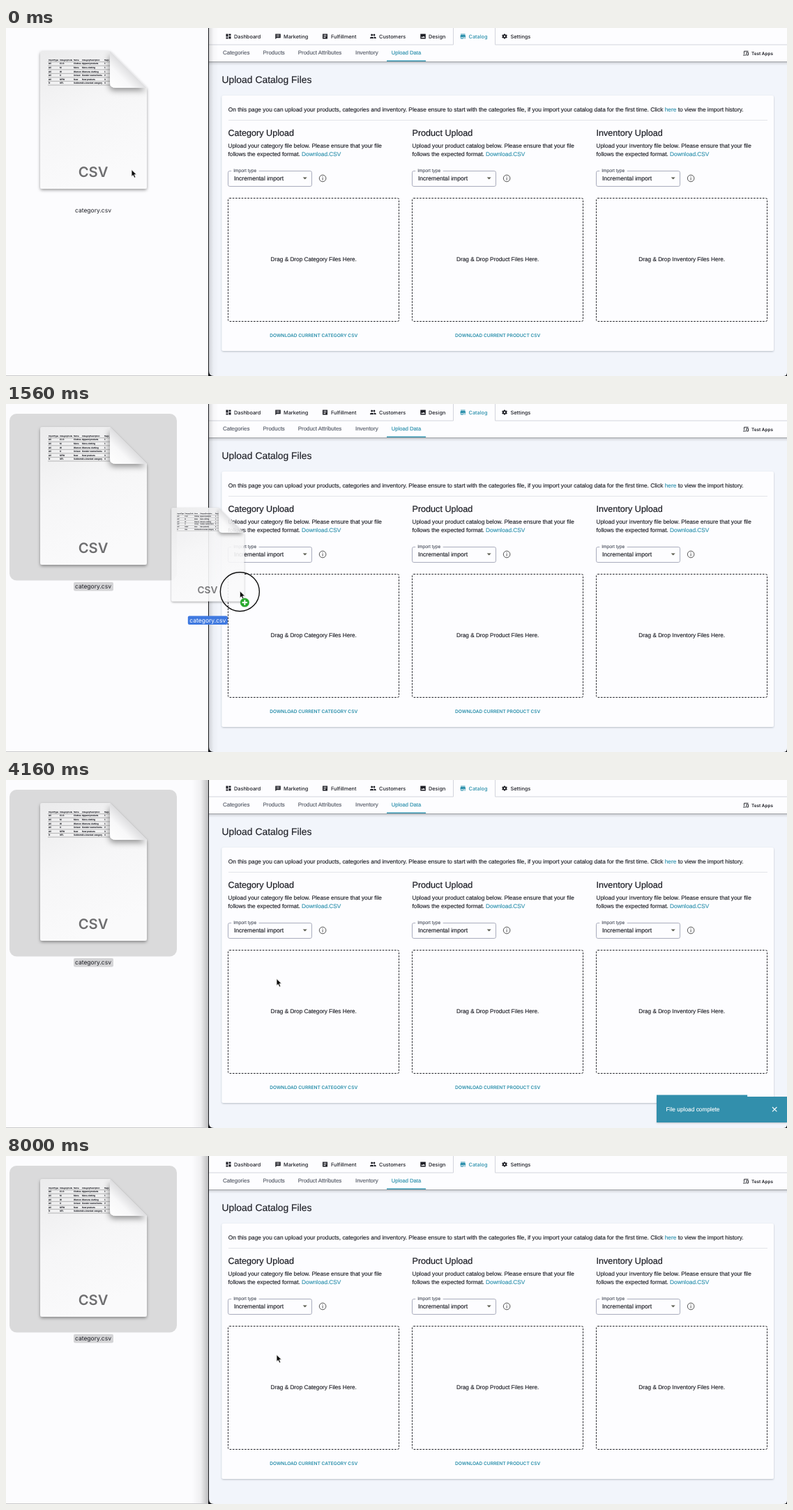
Write an HTML page that moves like this. It is 1120x500 px and loops after 8.04 s.

```html
<!DOCTYPE html>
<html lang="en">
<head>
<meta charset="utf-8">
<title>Upload Catalog Files</title>
<style>
html, body { margin: 0; width: 100%; height: 100%; overflow: hidden; background: #fcfcfe; }
svg { display: block; width: 1120px; height: 500px; }
text {
  text-rendering: geometricPrecision; font-family: "Liberation Sans", Arial, sans-serif; white-space: pre;
  color: #1c1d24; fill: currentColor; stroke: currentColor; stroke-width: .14;
}
tspan { fill: currentColor; stroke: currentColor; }
.ui { font-family: Inter, "Noto Sans", sans-serif; stroke: none; }
.mid { text-anchor: middle; }
.m { font-weight: 500; }
.b { font-weight: 600; }
.head { stroke-width: .2; }
.teal { color: #2a8fab; }
.soft { color: #555a66; }
.white { color: #fff; }
</style>
</head>
<body>
<svg id="stage" viewBox="0 0 1120 500" xmlns="http://www.w3.org/2000/svg">
  <defs>
    <linearGradient id="paper" x1="0" y1="0" x2=".35" y2="1">
      <stop offset="0" stop-color="#ebebec"/><stop offset=".5" stop-color="#f6f6f7"/><stop offset="1" stop-color="#fafafb"/>
    </linearGradient>
    <linearGradient id="flap" x1="0" y1="1" x2=".5" y2=".5">
      <stop offset="0" stop-color="#fff"/><stop offset=".6" stop-color="#f8f8f9"/><stop offset="1" stop-color="#dedee0"/>
    </linearGradient>
    <linearGradient id="side">
      <stop offset="0" stop-color="#000" stop-opacity="0"/><stop offset=".55" stop-color="#000" stop-opacity=".05"/><stop offset="1" stop-color="#000" stop-opacity=".25"/>
    </linearGradient>
    <linearGradient id="under" x2="0" y2="1">
      <stop offset="0" stop-color="#000" stop-opacity=".36"/><stop offset=".35" stop-color="#000" stop-opacity=".1"/><stop offset="1" stop-color="#000" stop-opacity="0"/>
    </linearGradient>
    <filter id="drop" x="-20%" y="-20%" width="140%" height="140%">
      <feDropShadow dx="0" dy="2" stdDeviation="2" flood-opacity=".38"/>
    </filter>
    <filter id="fold" x="-40%" y="-40%" width="180%" height="180%">
      <feDropShadow dx="-1" dy="4" stdDeviation="4" flood-opacity=".4"/>
    </filter>
    <filter id="lift" x="-20%" y="-20%" width="140%" height="140%">
      <feDropShadow dx="0" dy="1" stdDeviation="1.2" flood-color="#30344c" flood-opacity=".3"/>
    </filter>
    <clipPath id="sheet"><path d="M49 33H149V86H49Z"/></clipPath>
    <clipPath id="outline"><path id="edge" d="M52 33H149L202 86V228Q202 231 199 231H52Q49 231 49 228V36Q49 33 52 33Z"/></clipPath>
    <g id="file">
      <use href="#edge" filter="url(#drop)" fill="url(#paper)"/>
      <g id="sheetText" clip-path="url(#sheet)"></g>
      <g clip-path="url(#outline)"><path filter="url(#fold)" fill="url(#flap)" d="M149 33V78Q149 86 157 86H202Z"/></g>
      <text class="ui b mid" x="125" y="214.3" font-size="20.2" style="color:#6e6e70">CSV</text>
    </g>
  </defs>

  <rect width="1120" height="500" fill="#fcfcfe"/>
  <rect y="499" width="290" height="1" fill="#c9c9cc"/>
  <g id="desk">
    <rect id="picked" x="5" y="14" width="240" height="239.5" rx="10" fill="#dadadb"/>
    <use href="#file"/>
    <rect id="tag" x="97" y="256" width="57" height="12.5" rx="2"/>
    <text id="tagText" class="ui mid" x="125" y="265" font-size="8.5">category.csv</text>
  </g>
  <rect id="shade" x="266" width="24" height="499" fill="url(#side)"/>

  <path d="M290 0H1120V500H290Z" fill="#17181c"/>
  <path d="M291 0H1120V495Q1120 500 1115 500H298Q291 500 291 493Z" fill="#f2f5fb"/>
  <g id="page"></g>
  <rect id="backShade" width="14" height="499" fill="url(#side)" opacity=".6" transform="translate(305 0) scale(-1 1)"/>

  <g id="toast">
    <rect x="933" y="455" width="187" height="37" fill="#338fac" filter="url(#lift)"/>
    <rect id="bar" x="933" y="452.5" height="3" fill="#338fac"/>
    <text class="white" x="946.5" y="476" font-size="8.35">File upload complete</text>
    <path d="M1099 470l6.4 6.4m0-6.4l-6.4 6.4" stroke="#fff" stroke-width="1.1"/>
  </g>

  <g id="drag">
    <use id="dragFile" href="#file" opacity=".9"/>
    <g id="dragTag">
      <rect x="-28.5" y="-6.3" width="57" height="12.6" rx="2" fill="#3f79e0"/>
      <text class="ui mid white" y="2.8" font-size="8.5">category.csv</text>
    </g>
  </g>
  <g id="pointer">
    <circle id="ring" cy="1" fill="none" stroke="#111" stroke-width="1.4"/>
    <path d="M0 0V10L2.3 7.9 4 11.8 5.9 11 4.2 7.2H7.3Z" fill="#0b0b0b" stroke="#fff" stroke-width=".8" stroke-linejoin="round"/>
    <g id="plus">
      <circle cx="7" cy="16.5" r="6.6" fill="#25a72a" stroke="#c9e8c9" stroke-width=".5"/>
      <path d="M7 12.7v7.6M3.2 16.5h7.6" stroke="#fff" stroke-width="1.9"/>
    </g>
  </g>
</svg>
<script>
const $ = id => document.getElementById(id);
const text = (x, y, size, str, cls = "") =>
  `<text x="${x}" y="${y}" font-size="${size}" class="${cls}">${str}</text>`;
const rect = (x, y, w, h, attrs) => `<rect x="${x}" y="${y}" width="${w}" height="${h}" ${attrs}/>`;
const path = (d, attrs = "") => `<path d="${d}" ${attrs}/>`;

// Spreadsheet preview on the file icon
const cols = [61, 77, 97, 109, 141];
const rows = [
  "ImportType|CategoryCode|Name|CategoryDescription|Requ",
  "AC|CLO|Clothes|Apparel products|1", "AC|M|Mens|Mens clothing|1",
  "AC|W|Women|Womens clothing|1", "AC|U|Unisex|Gender neutral items|2",
  "AC|NEW|New|New products|3", "D|SEL|Subitems|Co-branded category|4"
];
$("sheetText").innerHTML = rows.map((row, i) =>
  row.split("|").map((s, c) => text(cols[c], 46.9 + i * 5.55, i ? 3.1 : 2.8, s)).join("") +
  path(`M60 ${48.7 + i * 5.55}H149`, 'stroke="#555" stroke-width=".4"')).join("");

// Navigation
const icons = [
  "M0 0h3v4h-3zM4 0h3v2.6h-3zM0 5h3v2h-3zM4 3.6h3v3.4h-3z",
  "M0 0h7.5v5.8h-5.6l-1.9 1.7zM1.5 1.4v.8h4.5v-.8zM1.5 3.3v.8h4.5v-.8z",
  "M0 0h7v7h-7zM1.4 1.4v.8h4.2v-.8zM1.4 3v.8h4.2v-.8zM1.4 4.7v.8h2.8v-.8z",
  "M2.7 0a1.5 1.5 0 1 0 .01 0zM6 .2a1.4 1.4 0 1 0 .01 0zM0 6.5v-1.2q2.7-2 5.4 0v1.2zM6 6.5v-1.5l-.6-.9q2.2-.1 3.3 1.2v1.2z",
  "M0 0h7.5v7h-7.5zM1 5.7h5.6l-1.9-2.6-1.4 1.7-.9-1z",
  "M.5 0h6.5v1h-6.5zM.5 1.6h6.5l.6 2v.8h-.6v2.6h-1v-2.6h-1.5v2.6h-4v-2.6h-.6v-.8zM1.5 4.5v1.5h2v-1.5z",
  "M2.7 0h1.6l.3 1 .9.4 1-.3.8 1.3-.8.8v.8l.8.8-.8 1.3-1-.3-.9.4-.3 1h-1.6l-.3-1-.9-.4-1 .3-.8-1.3.8-.8v-.8l-.8-.8.8-1.3 1 .3.9-.4zM3.5 2.4a1.2 1.2 0 1 0 .01 0z"
];
const nav = [["Dashboard", 315.5, 327], ["Marketing", 386.3, 398], ["Fulfillment", 454, 466],
  ["Customers", 522, 535], ["Design", 594.3, 606], ["Catalog", 651.5, 663.5], ["Settings", 711.5, 723.5]];
const subs = [["Categories", 311], ["Products", 368.5], ["Product Attributes", 418.7], ["Inventory", 501], ["Upload Data", 552.7]];
const teal = "#2a8fab";

let html = rect(291, 0, 829, 48, 'fill="#fdfdff"') + rect(291, 48, 829, 6, 'fill="url(#under)"') +
  path("M291 24H641.5V0M701.5 0V24H1120", 'fill="none" stroke="#d3d5dc"');
nav.forEach(([name, ix, x], i) => {
  const on = name === "Catalog";
  html += path(icons[i], `transform="translate(${ix} 8.4)" fill-rule="evenodd" fill="${on ? teal : "#1c1d24"}"`) +
    text(x, 14.6, 7.35, name, on ? "ui m teal" : "ui m");
});
subs.forEach(([name, x]) => {
  html += text(x, 38.3, name === "Upload Data" ? 7.65 : 7.95, name, name === "Upload Data" ? "teal" : "soft");
});
html += rect(546, 46.6, 56, 1.4, `fill="${teal}"`) +
  path("M1058.5 37.5v-4.2h6M1057 39h4M1061.9 35h2.6v4h-2.6z", 'fill="none" stroke="#1c1d24" stroke-width=".9"') +
  text(1069, 38.8, 6.4, "Test Apps", "ui b");

// Card
html += text(309.5, 78.5, 13.9, "Upload Catalog Files") +
  rect(309.5, 97, 791.5, 367, 'rx="2.5" fill="#fdfdff" filter="url(#lift)"') +
  text(318.7, 120, 8.35, "On this page you can upload your products, categories and inventory. Please ensure to start with the categories file, " +
    `if you import your catalog data for the first time. Click <tspan class="teal">here</tspan> to view the import history.`) +
  path("M319 132.5H1092", 'stroke="#e3e4ea"');

[["Category", "category file"], ["Product", "product catalog"], ["Inventory", "inventory file"]].forEach(([name, kind], i) => {
  const x = 318.5 + i * 264, mid = x + 122.7;
  html += text(x, 155, 12.6, name + " Upload", "head") +
    text(x, 172, 8.3, `Upload your ${kind} below. Please ensure that your file`) +
    text(x, 184, 8.3, `follows the expected format. <tspan class="teal">Download.CSV</tspan>`) +
    rect(x, 205.5, 120, 22, 'rx="2.3" fill="none" stroke="#a9acbd"') +
    rect(x + 4.7, 204, 39.5, 3, 'fill="#fdfdff"') +
    text(x + 7.7, 207.2, 6.6, "Import type", "soft") +
    text(x + 8.4, 219, 8.6, "Incremental import") +
    path(`M${x + 107.2} 214.6h6l-3 3z`, 'fill="#5b5d50"') +
    `<circle cx="${x + 135.6}" cy="216" r="4.8" fill="none" stroke="#555" stroke-width="1"/>` +
    path(`M${x + 135.6} 215.2v3.4M${x + 135.6} 213.2v1.1`, 'stroke="#555" stroke-width="1"') +
    rect(x, 244.5, 245, 177, `id="zone${i}" rx="2" fill="#fdfdff" stroke="#25262b" stroke-dasharray="2.6 1.7"`) +
    `<text id="hint${i}" class="mid" x="${mid}" y="335.2" font-size="8.22">Drag &amp; Drop ${name} Files Here.</text>`;
  if (i < 2) html += text(mid, 443.5, 6.6, `DOWNLOAD CURRENT ${name.toUpperCase()} CSV`, "ui b teal mid");
});
$("page").innerHTML = html;

// Timing in ms
const LOOP = 8040, STEP = 40;
const PRESS = 720, MOVE = 988, STOP = 1840, SHRINK = 1400, RELEASE = 1480, DROP = 1640, DONE = 2640, CLOSE = 7640;
const clamp = v => Math.max(0, Math.min(1, v));
const part = (t, a, b) => clamp((t - a) / (b - a));
const smooth = u => u * u * (3 - 2 * u);
const easeOut = u => 1 - (1 - u) ** 3;
const show = (id, on) => $(id).style.display = on ? "" : "none";
const put = (id, x, y, more = "") => $(id).setAttribute("transform", `translate(${x} ${y}) ${more}`);

function track(steps, u) {
  for (let i = 1; i < steps.length; i++) {
    const [a, from] = steps[i - 1], [b, to] = steps[i];
    if (u <= b) return from + (to - from) * easeOut(part(u, a, b));
  }
  return steps[steps.length - 1][1];
}
const enter = [[0, 1800], [.6, -15], [.75, 6], [.9, -3], [1, 0]];
const leave = [[0, 0], [.2, -12], [1, 1200]];

function draw(t) {
  const p = smooth(part(t, MOVE, STOP));
  const x = 180 + 208 * p, y = 203.5 + 82 * p + 42 * p * (1 - p) ** 1.5;
  put("pointer", x, y);

  const picked = t >= PRESS, dragging = t >= MOVE && t < DROP;
  show("picked", picked);
  show("tag", picked);
  $("tag").setAttribute("fill", t < MOVE ? "#3f79e0" : "#d4d4d6");
  $("tagText").style.color = picked && t < MOVE ? "#fff" : "";

  show("drag", dragging);
  show("plus", t >= 1440 && t < DROP);
  const less = .32 * smooth(part(t, SHRINK, 1560));
  const cx = x - 57.7 + 36.5 * less, cy = y - 73 + 64 * less;
  put("dragFile", cx, cy, `scale(${1 - less}) translate(-125.5 -132)`);
  put("dragTag", cx, cy + 130 - 111 * less);

  show("ring", picked && t < 1720);
  $("ring").setAttribute("r", 16 * easeOut(part(t, PRESS - 60, PRESS + 80)) + 12 * part(t, RELEASE, 1560) + 8 * part(t, 1560, 1720));
  $("ring").setAttribute("opacity", 1 - part(t, 1560, 1720));

  const waiting = t >= DROP && t < DONE;
  $("zone0").setAttribute("fill", waiting ? "#e7e7e9" : "#fdfdff");
  $("hint0").textContent = waiting ? "Drop your file here ..." : "Drag & Drop Category Files Here.";
  show("shade", t >= DROP);
  show("backShade", t < DROP);

  show("toast", t >= DONE && t < 8000);
  const closing = t >= CLOSE, u = part(t, closing ? CLOSE : DONE, (closing ? CLOSE : DONE) + 700);
  put("toast", track(closing ? leave : enter, u), 0);
  $("toast").setAttribute("opacity", closing ? 1 - easeOut(part(u, .2, 1)) : easeOut(part(u, 0, .6)));
  $("bar").setAttribute("width", 187 * (1 - part(t, DONE, CLOSE)));
}

const start = performance.now();
function frame() {
  const t = (performance.now() - start) % LOOP;
  draw(Math.floor(t / STEP) * STEP);
  requestAnimationFrame(frame);
}
frame();
</script>
</body>
</html>
```
